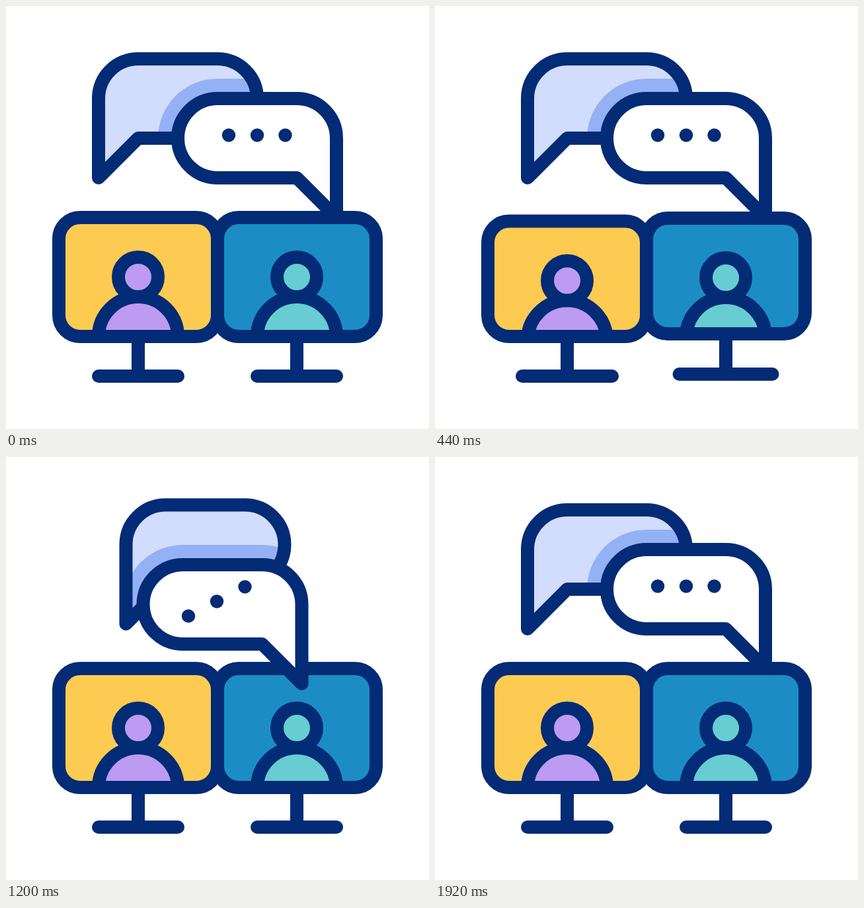
An HTML page that plays this animation: 640 by 640 pixels, repeating every 2 s.

```html
<!DOCTYPE html>
<html lang="en">
<head>
<meta charset="utf-8">
<title>Video chat</title>
<style>
  html, body { margin: 0; width: 100%; height: 100%; overflow: hidden; background: #fff; }
  svg { display: block; width: 100vw; height: 100vh; }
  .line { stroke: #032b76; stroke-width: 20; stroke-linecap: round; stroke-linejoin: round; }
  .dot { fill: #032b76; }
  .shade { fill: #93b1f4; stroke: #93b1f4; stroke-width: 60; stroke-linejoin: round; }
</style>
</head>
<body>
<svg viewBox="0 0 640 640">
  <defs>
    <path id="backShape" d="M140 260V140A60 60 0 0 1 200 80H320A60 60 0 0 1 320 200H200Z"/>
    <path id="frontShape" d="M320 140H440A60 60 0 0 1 500 200V320L440 260H320A60 60 0 0 1 320 140Z"/>
    <clipPath id="backClip"><use href="#backShape"/></clipPath>
  </defs>
  <g id="monitors"></g>
  <g id="back">
    <use href="#backShape" fill="#d2dcfd"/>
    <g clip-path="url(#backClip)"><use id="shade" class="shade" href="#frontShape"/></g>
    <use href="#backShape" class="line" fill="none"/>
  </g>
  <use id="front" href="#frontShape" class="line" fill="#fff"/>
  <g id="dots"></g>
</svg>
<script>
const LOOP = 2000, STEP = 40;
const NS = "http://www.w3.org/2000/svg";
const byId = id => document.getElementById(id);

function set(el, attrs) {
  for (const k in attrs) el.setAttribute(k, attrs[k]);
  return el;
}
function add(parent, tag, attrs) {
  return parent.appendChild(set(document.createElementNS(NS, tag), attrs));
}
const move = (el, x, y) => el.setAttribute("transform", `translate(${x} ${y})`);

// Hop poses, 80 ms apart: screen top, screen bottom, person, base y, base half-width
const HOP_START = 40, HOP_GAP = 80;
const HOP = [
  [0, 0, 0, 0, 60],
  [-28, -27, -31, -21, 54],
  [-41, -39, -45, -30.5, 51.5],
  [-24, -25.5, -27, -20, 58],
  [1, -4, 1, -3, 70.5],
  [5.5, 0, 5.5, 0, 68],
  [1, 0, 1, 0, 62],
  [0, 0, 0, 0, 60]
];

function hopPose(t) {
  const pos = (t - HOP_START) / HOP_GAP, last = HOP.length - 1;
  if (pos <= 0 || pos >= last) return HOP[0];
  const i = Math.floor(pos), u = pos - i;
  const row = n => HOP[Math.max(0, Math.min(last, n))];
  return HOP[0].map((_, k) => {
    const [a, b, c, d] = [-1, 0, 1, 2].map(n => row(i + n)[k]);
    return b + u * ((c - a) + u * ((2 * a - 5 * b + 4 * c - d) + u * (3 * b - a - 3 * c + d))) / 2;
  });
}

function makeMonitor(cx, screen, skin, delay) {
  const g = add(byId("monitors"), "g", {});
  const neck = add(g, "line", { class: "line", x1: cx, x2: cx });
  const base = add(g, "line", { class: "line" });
  const box = { x: cx - 120, width: 240, rx: 32 };
  const clip = add(add(g, "clipPath", { id: "clip" + cx }), "rect", box);
  const panel = add(g, "rect", { ...box, fill: screen });
  const inside = add(g, "g", { "clip-path": `url(#clip${cx})` });
  const person = add(inside, "g", {});
  add(person, "circle", { class: "line", cx, cy: 500, r: 60, fill: skin });
  add(person, "circle", { class: "line", cx, cy: 410, r: 30, fill: skin });
  const frame = add(g, "rect", { ...box, class: "line", fill: "none" });

  return time => {
    const [top, bottom, body, baseY, half] = hopPose(time - delay);
    const size = { y: 320 + top, height: 180 + bottom - top };
    for (const el of [clip, panel, frame]) set(el, size);
    move(person, 0, body);
    set(neck, { y1: 500 + bottom, y2: 560 + baseY });
    set(base, { x1: cx - half, x2: cx + half, y1: 560 + baseY, y2: 560 + baseY });
  };
}

const monitors = [
  makeMonitor(200, "#fdcb52", "#bd9bf2", 0),
  makeMonitor(440, "#1b8dc4", "#67cdd2", 80)
];
const dots = [337, 380, 422.5].map(cx =>
  add(byId("dots"), "circle", { class: "dot", cx, cy: 195.5, r: 10.2 }));

function ease(t, from, to) {
  const u = Math.max(0, Math.min(1, (t - from) / (to - from)));
  return u * u * (3 - 2 * u);
}
// Slides out, waits, and returns at the end of the loop
const slide = (t, from, to) => ease(t, from, to) - ease(t, 1680, 1920);

// One wave: up, down, back to rest
function bob(t, start) {
  const height = 26;
  return height * (-ease(t, start, start + 120)
    + 2 * ease(t, start + 120, start + 360)
    - ease(t, start + 360, start + 480));
}

function draw(t) {
  monitors.forEach(update => update(t));

  const f = slide(t, 440, 705), b = slide(t, 600, 870), d = slide(t, 440, 740);
  const fx = -52.5 * f, fy = 23 * f, bx = 41.5 * b, by = -7.5 * b;
  move(byId("front"), fx, fy);
  move(byId("back"), bx, by);
  move(byId("shade"), fx - bx, fy - by);
  dots.forEach((dot, i) => move(dot, -61 * d, 23 * d + bob(t, 880 + 80 * i)));
}

const begin = performance.now();
function tick() {
  const t = (performance.now() - begin) % LOOP;
  draw(Math.floor(t / STEP) * STEP);
  requestAnimationFrame(tick);
}
tick();
</script>
</body>
</html>
```
